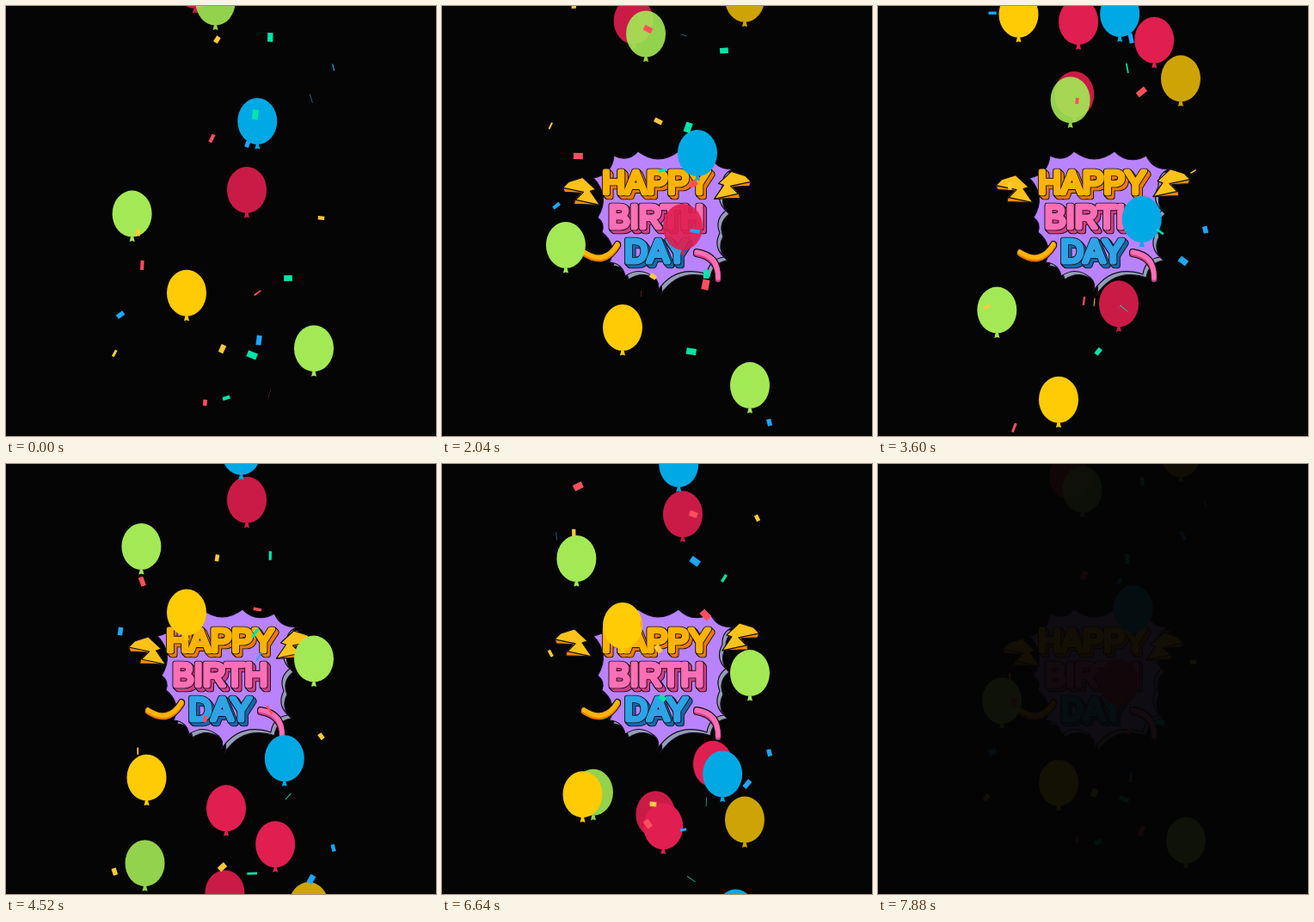
An HTML page with a canvas that plays this animation: 500x500 px, repeating every 8040 ms.

```html
<!DOCTYPE html>
<html>
<head>
<meta charset="utf-8">
<style>
html, body { margin: 0; width: 100%; height: 100%; overflow: hidden; background: #050505; }
canvas { display: block; width: 500px; height: 500px; }
</style>
</head>
<body>
<canvas id="stage" width="500" height="500"></canvas>
<script>
const g = document.getElementById('stage').getContext('2d');
const LOOP = 8040, LAST = 7880, FLIGHT = 4000, TAU = Math.PI * 2;
const INK = '#14101c', GREEN = '#a3e956', YELLOW = '#ffcb05', RED = '#e01e4f', BLUE = '#00a8e4';
const clamp = v => Math.max(0, Math.min(1, v));
const random = n => { const v = Math.sin(n * 127.1 + 3.7) * 43758.5453; return v - Math.floor(v); };

// A straight rise that passes (x, 250) at age `mid`; drift is the sideways slope
function balloon(age, color, x, drift, mid, speed, alpha = 1) {
  const rise = (age - mid) * speed;
  g.save();
  g.translate(x + drift * rise, 250 - rise);
  g.globalAlpha = alpha;
  g.fillStyle = color;
  g.beginPath();
  g.ellipse(0, 0, 23, 27, 0, 0, TAU);
  g.moveTo(-1.5, 26);
  g.lineTo(1.5, 26);
  g.lineTo(3, 32.5);
  g.lineTo(0, 31.5);
  g.lineTo(-3, 32.5);
  g.fill();
  g.restore();
}

function balloons(age) {
  balloon(age, RED, 238, -.066, 496, .317, .9);
  balloon(age, RED, 280, 0, 1251, .331, .9);
  balloon(age, YELLOW, 352, 0, 477, .343, .8);
  balloon(age, BLUE, 312, -.128, 2132, .366);
  balloon(age, BLUE, 307, -.127, 953, .285);
  balloon(age, YELLOW, 163.5, 0, 2174, .39);
  balloon(age, GREEN, 199, .175, 464, .284, .9);
  balloon(age, GREEN, 146, .074, 1330, .28);
  balloon(age, YELLOW, 210, 0, 1630, .31);
  balloon(age, GREEN, 358, 0, 1809, .33);
  balloon(age, RED, 317, .02, 307, .322);
  balloon(age, RED, 247, -.06, 2238, .42);
}

// Paper scraps that fall, spin and flip a whole number of times per loop
function confetti(t) {
  const colors = ['#00e5a8', '#1ea7ff', '#ffc93c', '#ff4f5e'];
  const turn = t / (2 * FLIGHT) * TAU;
  for (let i = 0; i < 20; i++) {
    const r = k => random(i * 7 + k);
    const w = 7 + 5 * r(1), falls = 2 + i % 2;
    g.save();
    g.translate(117 + 266 * r(2), (540 * (r(3) + falls * turn / TAU)) % 540 - 20);
    g.rotate(r(4) * TAU + turn * (i % 5 - 2));
    g.scale(1, Math.cos(r(5) * TAU + turn * (4 + i % 4)));
    g.fillStyle = colors[i % 4];
    g.fillRect(-w / 2, -w * .35, w, w * .7);
    g.restore();
  }
}

function paint(fill) {
  g.fillStyle = fill;
  g.fill();
  g.strokeStyle = INK;
  g.lineWidth = 1.2;
  g.stroke();
}

const tips = [[176, 200], [200, 174], [228, 169], [275, 169], [312, 174], [340, 189], [326, 210], [330, 238],
  [323, 264], [328, 292], [308, 312], [250, 332], [247, 316], [213, 314], [195, 298], [186, 263], [181, 246]];

// Joins the tips with curves that bow inwards
function burst(fill, shift) {
  g.save();
  g.translate(shift, shift);
  g.beginPath();
  g.moveTo(...tips[0]);
  tips.forEach(([x, y], i) => {
    const [nx, ny] = tips[(i + 1) % tips.length];
    g.quadraticCurveTo((x + nx) / 2 - (ny - y) * .38, (y + ny) / 2 + (nx - x) * .38, nx, ny);
  });
  paint(fill);
  g.restore();
}

// Scales a drawing about a point, with a small overshoot
function pop(t, start, x, y, draw) {
  const p = clamp((t - start) / 320) - 1;
  const s = 1 + 2.7 * p ** 3 + 1.7 * p * p;
  if (s <= 0) return;
  g.save();
  g.translate(x, y);
  g.scale(s, s);
  g.translate(-x, -y);
  draw();
  g.restore();
}

function word(text, y, color, side) {
  const pass = (style, width, d) => {
    g.strokeStyle = style;
    g.lineWidth = width;
    g.strokeText(text, 249, y + d);
  };
  const layer = (style, width, d) => {
    g.save();
    g.translate(d, 0);
    pass(style, width, d);
    g.restore();
  };
  g.font = '37px "Liberation Sans", Arial, sans-serif';
  g.textAlign = 'center';
  for (let d = 3.5; d > 0; d -= .5) layer(INK, 6.6, d);
  for (let d = 3.5; d > 0; d -= .5) layer(side, 4.8, d);
  layer(INK, 6.6, 0);
  layer(color, 4.8, 0);
  g.fillStyle = color;
  g.fillText(text, 249, y);
}

function ribbon(curve, color, side) {
  const line = (style, width, dy) => {
    g.save();
    g.translate(0, dy);
    g.strokeStyle = style;
    g.lineWidth = width;
    g.stroke(new Path2D(curve));
    g.restore();
  };
  line(INK, 8, 2);
  line(INK, 8, 0);
  line(side, 6, 2);
  line(color, 5.5, 0);
}

function bolt(slide) {
  const face = (fill, points) => {
    g.beginPath();
    points.forEach(p => g.lineTo(...p));
    g.closePath();
    paint(fill);
  };
  g.translate(slide, slide * .8);
  face('#ff8a00', [[135, 207], [137, 212], [156, 213], [149, 221], [148, 226], [178, 227], [159, 210]]);
  face('#ffc21a', [[142, 200], [158, 195], [173, 209], [167, 211], [178, 227], [150, 221], [159, 212], [135, 207]]);
}

function badge(t) {
  const slide = 3 + 7 * Math.cos((t - LAST) / 812 * TAU);
  g.lineJoin = g.lineCap = 'round';
  pop(t, 120, 252, 250, () => {
    burst('#949eb5', 4);
    burst('#b983ff', 0);
  });
  pop(t, 240, 250, 206, () => word('HAPPY', 218, '#ffb400', '#f07a00'));
  pop(t, 320, 250, 246, () => word('BIRTH', 258, '#ff6fb5', '#d43f86'));
  pop(t, 400, 250, 285, () => word('DAY', 298, '#2ea3e6', '#1769ad'));
  pop(t, 400, 190, 285, () => ribbon('M165 286Q189 302 204 277', '#ffb400', '#f07a00'));
  pop(t, 400, 305, 290, () => ribbon('M296 286Q322 290 321 316', '#ff6fb5', '#d43f86'));
  pop(t, 300, 180, 225, () => bolt(slide));
  pop(t, 300, 325, 220, () => {
    g.translate(500, -7);
    g.scale(-1, 1);
    bolt(slide);
  });
}

function frame(now) {
  const t = Math.min(LAST, Math.floor(now % LOOP / 40) * 40);
  g.fillStyle = '#050505';
  g.fillRect(0, 0, 500, 500);
  g.save();
  g.beginPath();
  g.rect(109, 0, 282, 500);
  g.clip();
  badge(t);
  // Two overlapping flights, each wrapping while its balloons are out of sight
  for (const lead of [1360, 3190]) balloons((t + lead + 1000) % FLIGHT - 1000);
  confetti(t);
  g.restore();
  // Fade everything to the background at the end
  g.globalAlpha = clamp((t - 7600) / 298);
  g.fillStyle = '#050505';
  g.fillRect(0, 0, 500, 500);
  g.globalAlpha = 1;
}

let begin;
function tick(now) {
  begin ??= now;
  frame(now - begin);
  requestAnimationFrame(tick);
}
requestAnimationFrame(tick);
</script>
</body>
</html>
```
